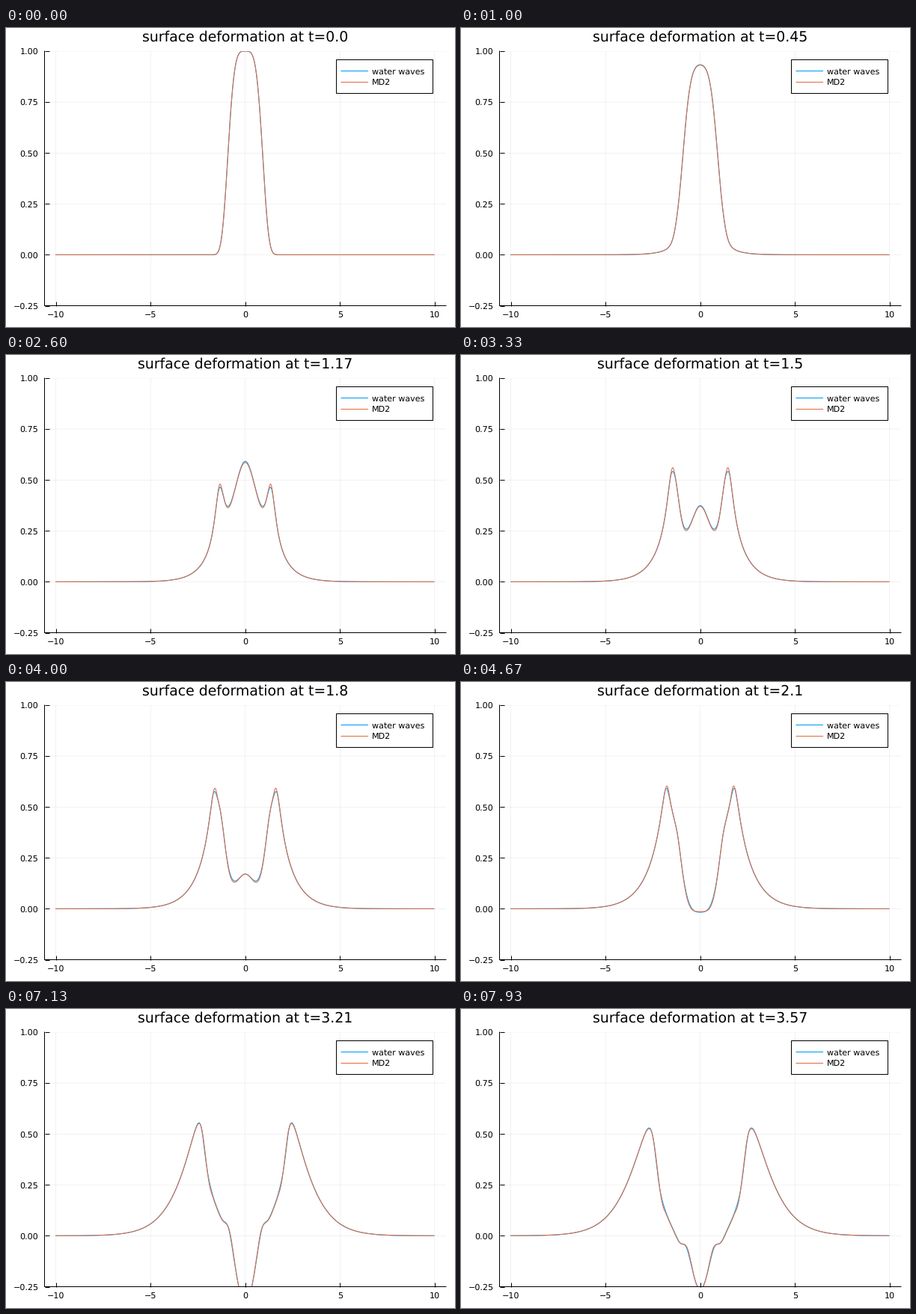
Animation, 600 px wide and 400 px high, one loop 8000 ms. Source, as a matplotlib script:

```python
import numpy as np
import matplotlib.pyplot as plt
from matplotlib.animation import FuncAnimation
from matplotlib.lines import Line2D
from matplotlib.patches import Rectangle

W, H, DPI = 600, 400, 100
STATES, LOOP = 120, 8000
TICKS = 2 * STATES          # two drawn frames per computed state
DT, SUBSTEPS = 0.03, 3
EPS, HALF, N = 0.25, 10.0, 512
BLUE, ORANGE = "#009afa", "#e36f47"
PX = 72 / DPI

grid = -HALF + 2 * HALF * np.arange(N) / N
k = 2 * np.pi * np.fft.fftfreq(N, 2 * HALF / N)
keep = np.abs(k) < np.abs(k).max() * 2 / 3
k_safe = np.where(k == 0, 1, k)


def apply(symbol, f):
    return np.fft.ifft(symbol * keep * np.fft.fft(f)).real


def ddx(f):
    return apply(1j * k, f)


def bump(x):
    return np.exp(-x ** 4)


def rk4(rhs, u, h):
    a = rhs(u)
    b = rhs(u + h / 2 * a)
    c = rhs(u + h / 2 * b)
    d = rhs(u + h * c)
    return u + h / 6 * (a + 2 * b + 2 * c + d)


def evolve(rhs, u):
    states = [u]
    for _ in range(STATES - 1):
        for _ in range(SUBSTEPS):
            u = rk4(rhs, u, DT / SUBSTEPS)
        states.append(u)
    return states


# Full Euler equations, in conformal variables (surface y, potential phi)
def conjugate(y):
    """Symbol giving the harmonic conjugate on the strip below the surface."""
    depth = 1 + y.mean()
    return np.where(k == 0, 0, -1j / np.tanh(k_safe * depth))


def surface_x(y):
    return grid + apply(conjugate(y), y)


def full_rhs(u):
    y, phi = u
    conj = conjugate(y)
    flux = apply(k * np.tanh(k * (1 + y.mean())), phi)
    xs = 1 + apply(1j * k * conj, y)
    ys, ps = ddx(y), ddx(phi)
    jac = xs ** 2 + ys ** 2
    q = flux / jac
    a = apply(conj, q)
    dy = a * ys + q * xs
    dphi = -y + a * ps + (flux ** 2 - ps ** 2) / (2 * jac)
    return np.array([apply(1, dy), apply(1, dphi)])


# Quadratic expansion of the same problem (elevation eta, potential psi)
lin = k * np.tanh(k)


def quad_rhs(u):
    eta, psi = u
    w, v = apply(lin, psi), ddx(psi)
    deta = w - EPS * (ddx(eta * v) + apply(lin, eta * w))
    dpsi = -eta - EPS / 2 * apply(1, v ** 2 - w ** 2)
    return np.array([deta, dpsi])


y0 = EPS * bump(grid)
for _ in range(60):
    y0 = EPS * bump(surface_x(y0))
full = [(surface_x(y), y / EPS)
        for y, _ in evolve(full_rhs, np.array([y0, 0 * y0]))]
quad = [eta for eta, _ in evolve(quad_rhs, np.array([bump(grid), 0 * grid]))]

plt.rcParams.update({
    "font.family": "DejaVu Sans",
    "font.size": 11.1 * PX,
    "text.hinting": "none",
    "path.snap": False,
})
fig = plt.figure(figsize=(W / DPI, H / DPI), dpi=DPI, facecolor="white")
ax = fig.add_axes([51.5 / W, 28.5 / H, 536.5 / W, 340.5 / H])
ax.set(xlim=(-10.6, 10.6), ylim=(-0.25, 1))
ax.set_xticks(range(-10, 11, 5))
ax.set_yticks(np.arange(-0.25, 1.01, 0.25))
ax.yaxis.set_major_formatter("{x:.2f}")
ax.set_axisbelow(True)
ax.grid(color="black", alpha=0.1, lw=0.5 * PX)
ax.spines[["top", "right"]].set_visible(False)
ax.spines[["left", "bottom"]].set_linewidth(PX)
ax.tick_params(direction="in", length=6 * PX, width=PX)
ax.tick_params(axis="x", pad=7 * PX)
ax.tick_params(axis="y", pad=8 * PX)

line_full, = ax.plot([], [], color=BLUE, lw=1.07 * PX)
line_quad, = ax.plot([], [], color=ORANGE, lw=1.07 * PX)
title = fig.text(319.75 / W, 1 - 18 / H, "", fontsize=18.9 * PX,
                 ha="center", va="baseline")


def legend_row(y, color, label):
    fig.add_artist(Line2D([448 / W, 483.5 / W], [1 - y / H] * 2,
                          color=color, lw=1.07 * PX))
    fig.text(488.7 / W, 1 - (y + 4) / H, label, va="baseline")


fig.add_artist(Rectangle((441.5, H - 87.5), 129, 45, transform=None,
                         fc="white", ec="black", lw=PX))
legend_row(57.5, BLUE, "water waves")
legend_row(72.5, ORANGE, "MD2")


def update(tick):
    i = min((tick + 1) // 2, STATES - 1)
    line_full.set_data(*full[i])
    line_quad.set_data(grid, quad[i])
    title.set_text(f"surface deformation at t={round(i * DT, 2)}")
    return line_full, line_quad, title


anim = FuncAnimation(fig, update, frames=TICKS, interval=LOOP / TICKS,
                     init_func=lambda: update(0), repeat=True, repeat_delay=0)
plt.show()
```
